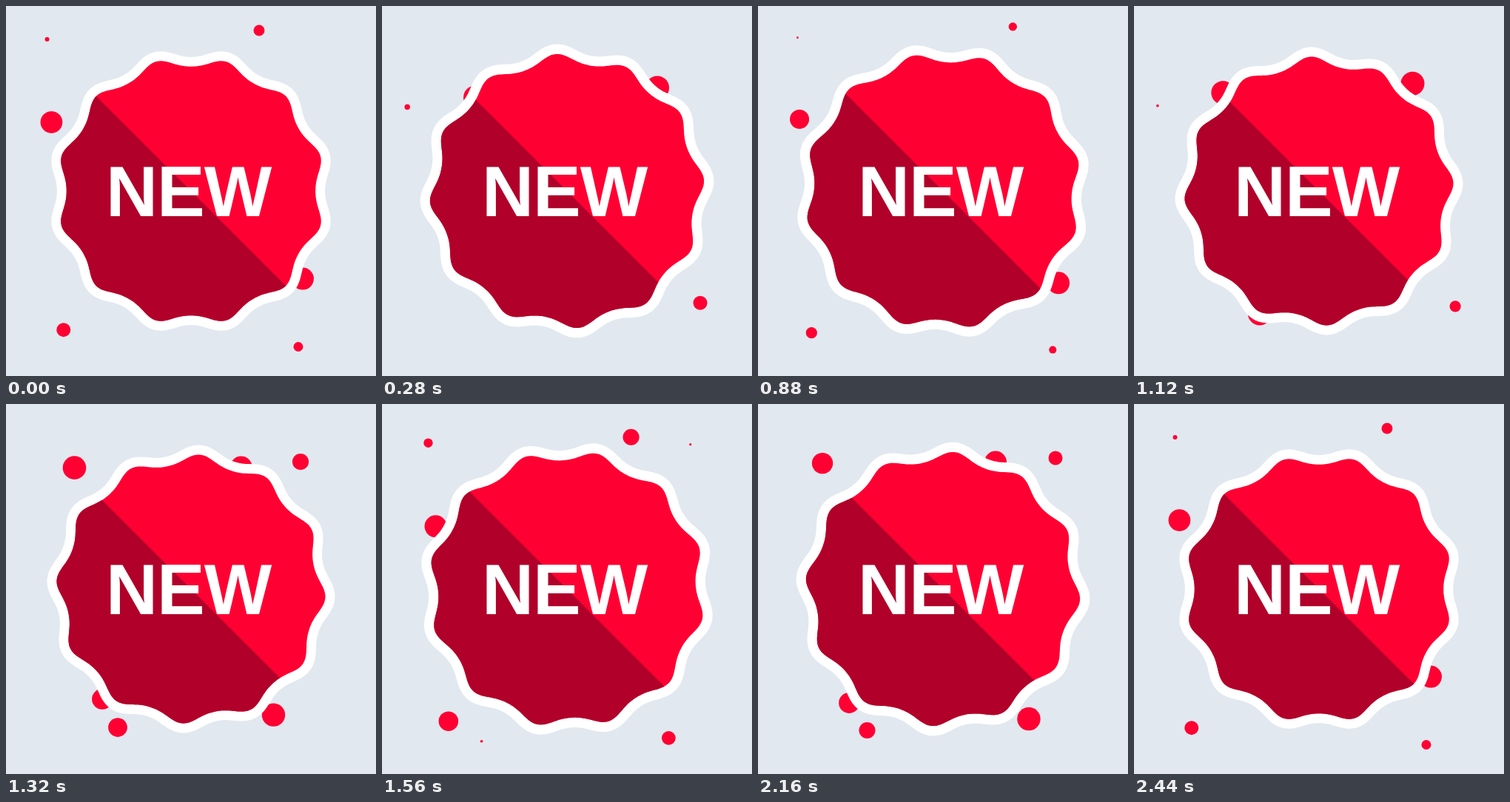
These frames come from a looping animation (500 px wide and 500 px high, 2480 ms). An HTML page with a canvas:

```html
<!DOCTYPE html>
<html lang="en">
<head>
<meta charset="utf-8">
<style>
  html, body { margin: 0; height: 100%; overflow: hidden; background: #e1e8f0; }
  canvas { display: block; }
</style>
</head>
<body>
<canvas id="stage" width="500" height="500"></canvas>
<script>
const ctx = document.getElementById('stage').getContext('2d');
const LOOP = 2480, STEP = 40, SPIN = 2440, PULSE = 1220, BURST = 800;
const RED = '#ff0033', DARK = '#b1002a';

// Where and when each dot vanishes, its velocity (px/ms), shrink rate and full radius
const dots = [
  { x: 52.8, y: 42, vx: -.142, vy: -.158, end: 915, shrink: .04, max: 16 },
  { x: 348.3, y: 19.3, vx: .083, vy: -.18, end: 1006, shrink: .045, max: 15 },
  { x: 417.4, y: 53.8, vx: .113, vy: -.141, end: 800, shrink: .0396, max: 16 },
  { x: 31, y: 134.1, vx: -.146, vy: -.11, end: 1160, shrink: .0465, max: 15 },
  { x: 443.6, y: 416.5, vx: .132, vy: .1485, end: 1280, shrink: .0475, max: 15 },
  { x: 404.8, y: 472.4, vx: .1134, vy: .1368, end: 1020, shrink: .0361, max: 15.7 },
  { x: 59.8, y: 451, vx: -.175, vy: .13, end: 1040, shrink: .0475, max: 14 },
  { x: 134, y: 456.4, vx: -.099, vy: .113, end: 800, shrink: .046, max: 16 }
];

function drawDot(dot, time) {
  const left = ((dot.end - time) % BURST + BURST) % BURST;
  const travel = left - 120 * (1 - Math.exp(-left / 120));
  const radius = Math.min(dot.max, dot.shrink * left);
  ctx.beginPath();
  ctx.arc(dot.x - dot.vx * travel, dot.y - dot.vy * travel, radius, 0, 2 * Math.PI);
  ctx.fill();
}

function badgePath(time) {
  const scale = 1 + .057 * (1 - Math.cos(2 * Math.PI * time / PULSE)) / 2;
  const turn = Math.PI / 2 * time / SPIN;
  const path = new Path2D();
  for (let i = 0; i < 360; i++) {
    const a = i * Math.PI / 180;
    const r = scale * (174 - 6.5 * Math.cos(12 * a) + .7 * Math.cos(24 * a));
    path.lineTo(250 + r * Math.cos(a + turn), 250 + r * Math.sin(a + turn));
  }
  path.closePath();
  return { path, scale };
}

function draw(time) {
  ctx.fillStyle = '#e1e8f0';
  ctx.fillRect(0, 0, 500, 500);

  ctx.fillStyle = RED;
  // The burst holds for its first step
  dots.forEach(dot => drawDot(dot, Math.max(time, STEP)));

  const { path, scale } = badgePath(time);
  ctx.lineJoin = 'round';
  ctx.lineWidth = 25.8 * scale;
  ctx.strokeStyle = '#fff';
  ctx.stroke(path);
  ctx.fill(path);

  ctx.save();
  ctx.clip(path);
  ctx.fillStyle = DARK;
  ctx.beginPath();
  ctx.moveTo(0, 0);
  ctx.lineTo(500, 500);
  ctx.lineTo(0, 500);
  ctx.fill();
  ctx.restore();

  ctx.fillStyle = '#fff';
  ctx.font = '700 97px "Liberation Sans", Arial, sans-serif';
  ctx.letterSpacing = '-1px';
  ctx.fillText('NEW', 135, 284);
}

function tick() {
  const time = performance.now() % LOOP;
  draw(Math.floor(time / STEP) * STEP);
  requestAnimationFrame(tick);
}
tick();
</script>
</body>
</html>
```
